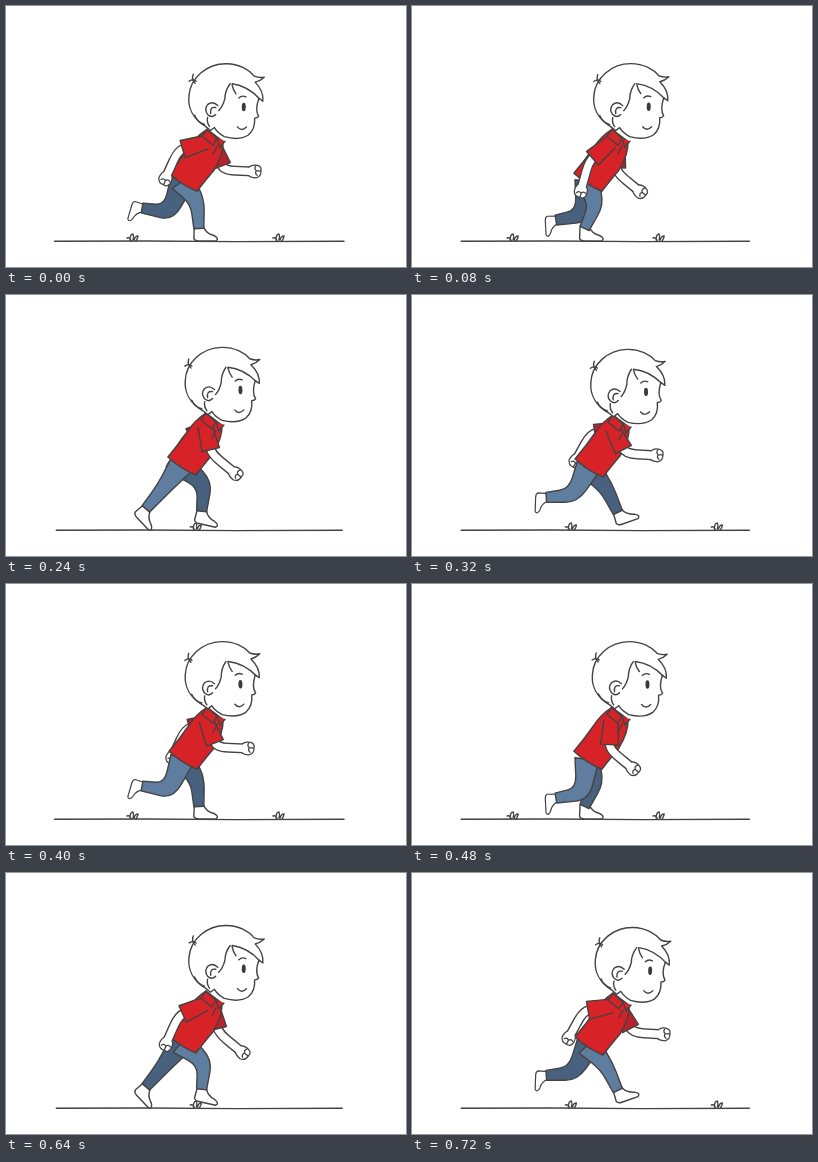
An HTML page that plays this animation: 400 by 261 pixels, repeating every 0.8 s.

```html
<!DOCTYPE html>
<html lang="en">
<head>
<meta charset="utf-8">
<title>Running boy</title>
<style>
html, body { margin: 0; width: 100%; height: 100%; overflow: hidden; background: #fff; }
svg { display: block; width: 100vw; height: 100vh; }
path, ellipse { stroke: #444242; stroke-width: 1.4; stroke-linejoin: round; stroke-linecap: round; }
.line { fill: none; }
.skin { fill: #fff; }
.ink { fill: #3b3939; stroke: none; }
.shirt { fill: #d72328; }
.shade { fill: #b9222a; }
.near { fill: #5e7d9f; }
.far { fill: #48617f; }
.edge { fill: none; stroke-width: 10.2; stroke-linecap: butt; }
.core { fill: none; stroke: #fff; stroke-width: 7.4; }
.pose { visibility: hidden; animation: show .8s step-end infinite; }
@keyframes show { 0% { visibility: visible; } 10%, 100% { visibility: hidden; } }
</style>
</head>
<body>
<svg id="stage" viewBox="0 0 400 261"></svg>
<script>
const STEP = 80, COUNT = 10, STRIDE = COUNT / 2, FLOOR = 235;

const path = (d, cls, extra = '') => `<path class="${cls}" d="${d}" ${extra}/>`;
const lerp = (a, b, t) => [a[0] + (b[0] - a[0]) * t, a[1] + (b[1] - a[1]) * t];
const dir = (a, b) => Math.atan2(b[1] - a[1], b[0] - a[0]);
const side = (p, angle, r) => [p[0] - Math.sin(angle) * r, p[1] + Math.cos(angle) * r];
const bend = (p, c, q) => `${p}L${lerp(c, p, .4)}Q${c} ${lerp(c, q, .4)}L${q}`;
const rad = degrees => degrees * Math.PI / 180;

// Mean value plus [cos, sin] weights for each harmonic of the run cycle
const wave = (i, mean, ...parts) => parts.reduce((sum, [c, s], n) => {
  const a = 2 * Math.PI * i / COUNT * (n + 1);
  return sum + c * Math.cos(a) + s * Math.sin(a);
}, mean);

// Swing angles in degrees: 0 hangs down, positive points forward
const swing = {
  thigh: i => wave(i, 7, [30, -31], [0, 0], [0, 8.5]),
  shin: i => wave(i, -38.7, [51.6, -7.2], [-10, -11.8], [0, -10]),
  upper: i => wave(i, -26, [-47.6, 26.4]),
  lower: i => wave(i, 19.5, [-56, 21], [12, -6])
};
const hang = ([x, y], degrees, length) =>
  [x + Math.sin(rad(degrees)) * length, y + Math.cos(rad(degrees)) * length];

function leg(hip, i, cls) {
  const shin = swing.shin(i);
  const planted = i % COUNT < 2;
  const turn = planted ? 0 : 6 - shin;
  const scale = turn > 60 ? .85 : 1;
  const drop = scale * (12.5 * Math.cos(rad(turn)) + 17 * Math.max(0, Math.sin(rad(turn))));
  const knee = hang(hip, swing.thigh(i), wave(i, 30, [-4.3, -2.3]));
  const ankle = hang(knee, shin, 27);
  ankle[1] = Math.min(ankle[1], FLOOR - drop);

  const up = dir(hip, knee), low = dir(knee, ankle);
  const mid = Math.atan2(Math.sin(up) + Math.sin(low), Math.cos(up) + Math.cos(low));
  const kneeR = 7 / Math.max(.75, Math.cos(mid - up));
  const edge = s => [side(hip, up, 12 * s), side(knee, mid, kneeR * s), side(ankle, low, 5 * s)];
  const [a, b, c] = edge(1), [d, e, f] = edge(-1);
  return path('M-4.5-2L-5 10Q-4 12.5 0 12.5H17Q21 10 15 7Q7 5 4.5-2Z', 'skin',
    `transform="translate(${ankle}) rotate(${turn}) scale(${scale})"`) +
    path(`M${bend(a, b, c)}L${bend(f, e, d)}Z`, cls);
}

function arm(shoulder, i, cls) {
  const elbow = hang(shoulder, swing.upper(i), 29);
  const hand = hang(elbow, swing.lower(i), 30);
  const up = dir(shoulder, elbow);
  const start = lerp(shoulder, elbow, .5), cuff = lerp(shoulder, elbow, .84);
  const at = `transform="translate(${hand}) rotate(${90 - swing.lower(i)}) scale(.9)"`;
  const sleeve = [
    side(shoulder, up, 7), side(cuff, up, 9), side(cuff, up, -9), side(shoulder, up, -7)
  ];
  return path('M' + bend(start, elbow, hand), 'edge') +
    path('M-5-5Q-2-8 4-7Q9-6 8-1Q9 5 3 7Q-4 7-6 4Z', 'skin', at) +
    path('M' + bend(start, elbow, lerp(elbow, hand, .88)), 'core') +
    path('M2-6Q0-3 3-1H8M3-1Q1 2 4 4', 'line', at) +
    path('M' + sleeve.join('L'), cls);
}

function shirt(x, y) {
  return `<g transform="translate(${x} ${y})">` +
    path('M201 124L217 136Q218 148 208 165Q201 173 191 186Q176 180 163 168Q174 155 183 142Q190 131 201 124Z', 'shirt') + '</g>';
}

function collar(x, y) {
  return `<g transform="translate(${x} ${y})">` +
    path('M201 124L196 131L207 140L211 133ZM211 133L214 142L219 136', 'shirt') +
    path('M211 141L207 149', 'line') + '</g>';
}

function head(x, y, tilt) {
  return `<g transform="translate(${x} ${y}) rotate(${tilt} 215 130)">` +
    path('M198 121C186 114 180 103 181 91C182 72 199 58 218 58C231 58 241 64 246 70Q251 72 256 71Q252 75 247 76Q256 85 255 95L251 92Q247 104 251 110Q250 112 247 112Q248 123 241 129Q232 135 217 131Q210 127 207 122L203 125Z', 'skin') +
    path('M224 78Q240 80 252 93M222 78Q217 85 217 93Q215 101 211 105M224 79Q225 84 228 88', 'line') +
    path('M187 78Q183 74 185 69M181 76Q185 73 188 76', 'line') +
    path('M187 110Q190 117 197 119M200 112Q199 117 202 121', 'line') +
    path('M210 100Q205 95 200 99Q196 104 200 109Q204 113 208 109M208 102Q202 101 203 108', 'skin') +
    path('M231 92Q234 89 238 91M230 121Q234 126 239 121', 'line') +
    '<ellipse class="ink" cx="236" cy="101" rx="2" ry="4.2"/></g>';
}

function ground(k) {
  const left = 49.5 - Math.cos(k * 2 * Math.PI / STRIDE), right = 386.5 - left;
  const blades = 'M-6-2Q-3-3-2 1M-3 0Q-3-6 0-6Q1-4 0 0M1 0Q2-4 5-4Q5-2 3 1';
  const first = 127 - 25 * k - .85 * k * k;
  const tufts = [0, 1, 2].map(n => first + n * 146).filter(x => x > 60 && x < 325);
  return path(`M${left} 235.3L140 235L230 235.6L${right} 235.2`, 'line') +
    tufts.map(x => path(blades, 'line', `transform="translate(${x} 234)"`)).join('');
}

function pose(i) {
  const k = i % STRIDE;
  const beat = shift => Math.cos((k - shift) * 2 * Math.PI / STRIDE);
  const x = beat(-.5) - .8, y = -3.1 - 2.9 * beat(3);
  const sway = Math.cos((i + 1) * 2 * Math.PI / COUNT);
  const hip = [176 + x, 176 + y];
  return `<g class="pose" style="animation-delay:${(i - COUNT) * STEP}ms">` +
    ground(k) +
    arm([207 + x, 138 + y], i + STRIDE, 'shade') +
    leg(hip, i + STRIDE, 'far') +
    leg(hip, i, 'near') +
    shirt(x, y) +
    arm([200 + x, 137 + y], i, 'shirt') +
    collar(x, y) +
    head(.2 + 1.4 * sway, y + .4, 1.3 * sway - .2) + '</g>';
}

document.getElementById('stage').innerHTML = Array.from({ length: COUNT }, (_, i) => pose(i)).join('');
</script>
</body>
</html>
```
